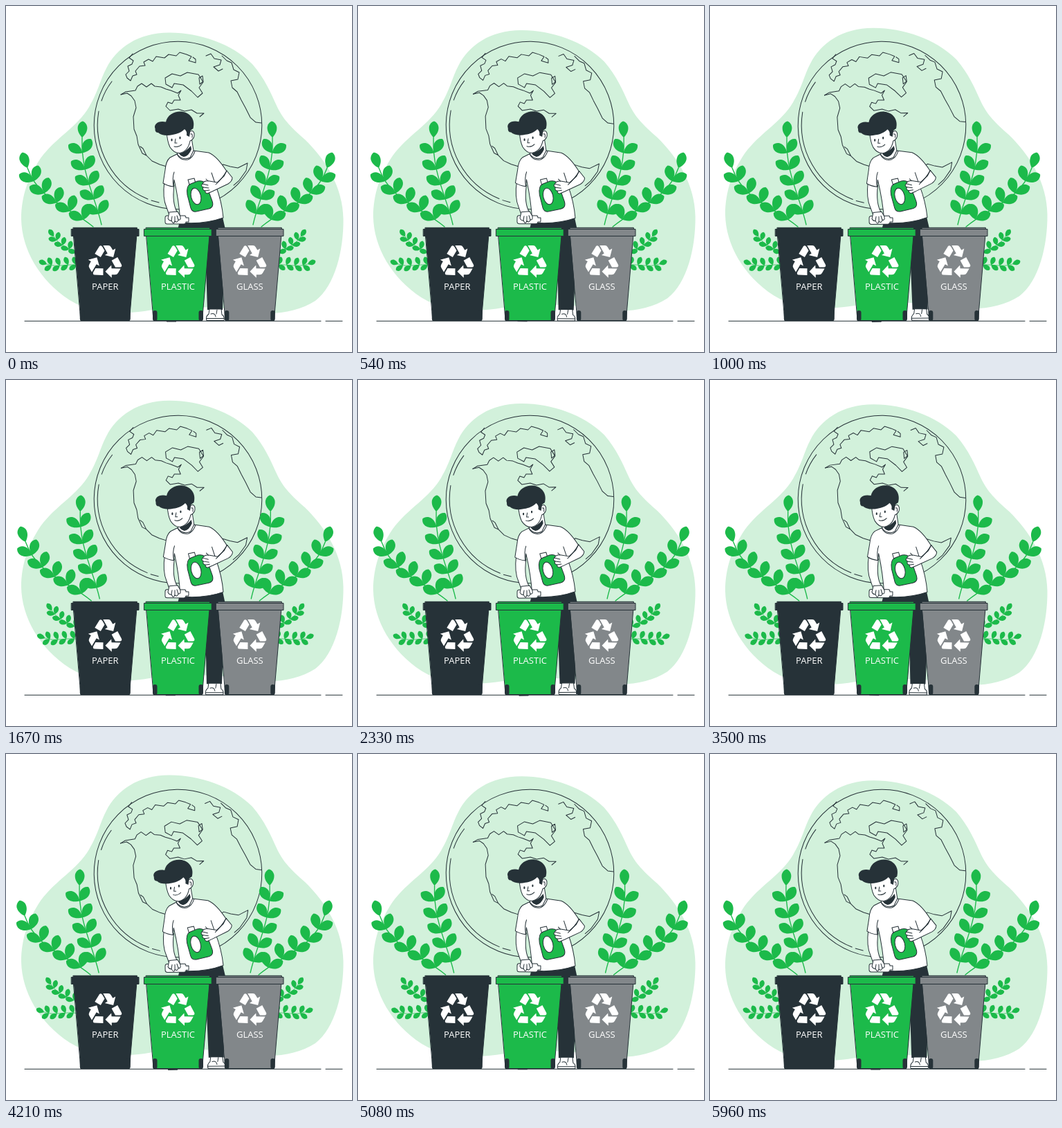
Recreate the animation shown at these times as an HTML page. Size 500 by 500 pixels, loop 6 s.

```html
<!DOCTYPE html>
<html lang="en">
<head>
<meta charset="utf-8">
<title>Sorting waste</title>
<style>
html, body { margin: 0; width: 100%; height: 100%; overflow: hidden; background: #fff; }
svg { display: block; width: 100%; height: 100%; }
.ink { fill: none; stroke: #263238; stroke-width: 1; stroke-linecap: round; stroke-linejoin: round; }
.skin { fill: #fff; stroke: #263238; stroke-width: 1; stroke-linecap: round; stroke-linejoin: round; }
.dark { fill: #263238; }
.green { fill: #1cba4a; }
.stem { fill: none; stroke: #1cba4a; stroke-linecap: round; }
.label { font: 400 13px "Open Sans", "Noto Sans", sans-serif; font-stretch: 75%; fill: #fff; text-anchor: middle; }
</style>
</head>
<body>
<svg viewBox="0 0 500 500">
  <defs>
    <g id="arrow" fill="#fff">
      <path d="M-15-12L-8.500-22.500Q-6.300-25-4-22L-.8-16.500L-6.500-7Z"/>
      <path d="M-3-24H4.500Q7-24 8.500-21.600L11-17.300L15-19.600L11.800-7L-.5-10L3.400-12.600Z"/>
    </g>
    <g id="recycle">
      <use href="#arrow"/>
      <use href="#arrow" transform="rotate(120)"/>
      <use href="#arrow" transform="rotate(240)"/>
    </g>
  </defs>

  <path id="blob" fill="#d2f1db" d="M237 38.5C192 38 160 60 145 90C136 107 134 122 120 146C103 175 72 190 50 220C32 247 22 275 22 308C23 352 48 396 92 425C125 446 165 445 200 441C245 434 300 433 345 441C385 448 420 443 447 426C476 404 488 352 487.500 308C487 262 462 222 432 193C412 175 402 166 392 146C382 124 374 105 356 84C326 54 280 39 237 38.500Z"/>

  <g id="globe" class="ink">
    <circle cx="248.500" cy="172.500" r="121.300"/>
    <path d="M153 109Q143 122 138 137M134 152A115.500 115.500 0 0 0 205 279M210 281L221 284"/>
    <path d="M183 69L178 75L184 79L182 84L176 87L178 94L173 99L175 104L180 108L183 101L189 99L187 94L193 87L201 86L199 81L206 77L212 80L217 73L229 75L235 70L246 72L251 67L261 70L268 73L264 79L274 82L274 77L270 74"/>
    <path d="M166 128L173 124L187 122L190 116L196 112L203 117L210 112L215 116L224 117L231 120L238 122L248 126L253 122L249 129L252 136L243 136L240 141L234 139L231 145L237 151L249 149L258 152L268 150L276 155L286 155L280 160"/>
    <path d="M230 104L240 98L252 101L262 96L278 99L285 110L279 118L284 126L277 132L268 123L256 114L243 112L240 118L231 113Z"/>
    <path d="M279 104L284 101L285 109L280 113Z"/>
    <path d="M166 128L175 126L181 130L186 137L188 147L184 160L185 178L189 188L191 200L197 213L203 216L198 206L194 203M203 216L211 224L222 229L232 232L239 240L246 238"/>
    <path d="M289 72L296 69L301 76L311 78L309 85L300 88L307 94L313 91M312 72L319 79L326 82L329 92L337 96L335 106L325 108L327 118L334 124L340 136L346 147L353 161L361 168L369 169"/>
    <path d="M303 235L314 229L324 232L335 234L349 227L347 238L337 252L329 259"/>
  </g>

  <g id="plants"></g>
  <path class="ink" d="M27 455.300H455M462 455.300H486"/>

  <g id="man">
    <path class="dark" d="M251 311L313 305L317 323L313 439H291L288 340L254 350L246 440H238L244 340Z"/>
    <path class="dark" d="M232 453H246V456.500H232Z"/>
    <path class="skin" d="M294 438H311L312 446Q316 448 315 454.500H290Q288 449 293 445Z"/>
    <path class="ink" d="M290 451.500H315M296 445Q302 443 303 449M305 439L304 445"/>

    <path class="skin" d="M229 253C227 268 227 280 232 291L236 302L248 299C241 288 241 274 243 259Z"/>
    <path class="skin" d="M247 214L237 219Q231 224 230 237L227 256Q233 260 242 261L243 251Q250 281 252 313Q286 316 314 306Q312 283 303 259L315 245L319 239Q305 217 293 212L271 209L263 216Z"/>
    <path class="ink" d="M242 261Q240 248 243 240M303 259L297 241M247 214Q252 224 263 222Q270 219 273 210"/>
    <path class="skin" stroke-width="0" d="M248 207L248 215Q256 224 266 219L271 209L268 190Z"/>
    <path class="dark" d="M250 213Q260 211 267 202L268 207Q264 217 257 218Q252 217 250 213Z"/>
    <path class="skin" d="M232 181Q233 196 237 204Q243 213 251 212.500Q263 210 266 195Q273 192 272 184Q270 178 265 182L260 170Z"/>
    <path class="dark" d="M215.500 177C213 171 220 165 231 167.500C233 157 244 151.500 254 152.500C266 154 274 164 270.500 177L266.500 180L265 189L261 187Q262 181 258 178C253 183 247 185 241 186C233 188 224 187 220 183Q215 183 215.500 177Z"/>
    <ellipse class="dark" cx="239.500" cy="193.500" rx="1.100" ry="1.900"/>
    <ellipse class="dark" cx="251.500" cy="190.500" rx="1.100" ry="1.900"/>
    <path class="ink" d="M245 192L244 198L247 198M243 203Q249 205 254 200M267 185Q270 184 269 190"/>

    <path class="skin" d="M233 303H258Q260 303 260 306H264V312H260Q260 315 257 315H233Q230 315 230 312V306Q230 303 233 303Z"/>
    <path class="skin" d="M236 298L234 307Q236 311 239 310Q242 317 244 311Q248 314 249 309Q253 310 252 304L248 297Z"/>
    <path class="ink" d="M239 310L240 304M244 311V304M249 309L247 303"/>

    <path class="skin" d="M263 251L272 249L274 256L265 258Z"/>
    <path class="green" stroke="#263238" d="M267 257L277 253Q287 251 290 260L298 282Q301 291 293 293L275 297Q269 298 267 292L262 273Q260 260 267 257Z"/>
    <ellipse class="skin" cx="274.500" cy="275" rx="7" ry="12" transform="rotate(-14 274.500 275)"/>
    <path class="skin" d="M319 238L327 248Q327 253 321 257L298 268L291 271Q287 270 288 267Q283 266 285 262Q281 260 284 257Q286 252 294 253L305 255L315 246Z"/>
    <path class="ink" d="M284 257L292 259M285 262L293 263M288 267L294 266M292 253L289 250M303 258Q313 249 319 238"/>
  </g>

  <g id="bins"></g>
</svg>
<script>
const byId = id => document.getElementById(id);

// Shrub branch: paired leaves along a cubic stem, turned left and right by fixed angles.
function branch([x0, y0, x1, y1, x2, y2, x3, y3], pairs, size, left, right) {
  const bez = (a, b, c, d, t) => {
    const u = 1 - t;
    return u * u * u * a + 3 * u * u * t * b + 3 * u * t * t * c + t * t * t * d;
  };
  const leaf = (t, angle) =>
    `<path class="green" transform="translate(${bez(x0, x1, x2, x3, t)} ${bez(y0, y1, y2, y3, t)}) rotate(${angle}) scale(${size})"
      d="M0 0C-.12-.12-.3-.32-.3-.6C-.3-.82-.14-.98 0-1.020C.14-.98 .3-.82 .3-.6C.3-.32 .12-.12 0 0Z"/>`;
  const tip = Math.atan2(x3 - x2, y2 - y3) * 180 / Math.PI;
  let out = `<path class="stem" stroke-width="${size / 17}" d="M${x0} ${y0}C${x1} ${y1} ${x2} ${y2} ${x3} ${y3}"/>`;
  for (let i = 0; i < pairs; i++) {
    const t = 0.13 + i * 0.72 / (pairs - 1);
    out += leaf(t, left) + leaf(t, right);
  }
  return out + leaf(1, tip);
}

const shrub =
  branch([138, 316, 129, 275, 108, 242, 110, 190], 5, 23, -60, 32) +
  branch([126, 319, 92, 290, 48, 282, 31, 234], 5, 23, -66, 15) +
  branch([108, 358, 92, 353, 78, 346, 69, 333], 4, 12, -78, 15) +
  branch([108, 375, 92, 371, 74, 379, 59, 373], 4, 12, -125, -22);
byId("plants").innerHTML = `<g>${shrub}</g><g transform="translate(495 0) scale(-1 1)">${shrub}</g>`;

const bin = (x, color, text) => `<g transform="translate(${x} 0)">
  <path class="ink" style="fill:${color}" d="M-45.500 332H45.500L35 454.500H-35Z"/>
  <rect class="ink" style="fill:${color}" x="-46" y="320.300" width="92" height="4"/>
  <rect class="ink" style="fill:${color}" x="-48.700" y="322.500" width="97.400" height="10"/>
  <rect class="dark" x="-36.500" y="440" width="6.500" height="15" rx="3"/>
  <rect class="dark" x="30" y="440" width="6.500" height="15" rx="3"/>
  <use href="#recycle" y="370"/>
  <text class="label" y="410">${text}</text></g>`;
byId("bins").innerHTML = bin(143.3, "#263238", "PAPER") + bin(248.5, "#1cba4a", "PLASTIC") + bin(352.3, "#82878a", "GLASS");

// Linear interpolation through [fraction, value] stops.
function tween(stops, p) {
  const i = stops.findIndex(s => s[0] > p);
  const [a, va] = stops[i - 1], [b, vb] = stops[i];
  return va + (vb - va) * (p - a) / (b - a);
}
const FLOAT = [[0, 0], [0.5, -10], [1, 0]];
const SWAY = [[0, 0], [0.25, 1], [0.75, -1], [1, 0]];
const SHAKE = [0, -1, 2, -4, 4, -4, 4, -4, 2, -1, 0].map((x, i) => [i / 10, x]);

function draw(ms) {
  const phase = period => ms % period / period;
  const sway = tween(SWAY, phase(1500));
  byId("blob").setAttribute("transform", `translate(0 ${tween(FLOAT, phase(3000))})`);
  byId("plants").setAttribute("transform", `translate(${tween(SHAKE, phase(6000))} 0)`);
  byId("globe").setAttribute("transform", `rotate(${sway} 248.5 172.5)`);
  byId("man").setAttribute("transform", `rotate(${sway} 270 304)`);
}

const start = performance.now();
function loop() {
  draw((performance.now() - start) % 6000);
  requestAnimationFrame(loop);
}
draw(0);
requestAnimationFrame(loop);
</script>
</body>
</html>
```
